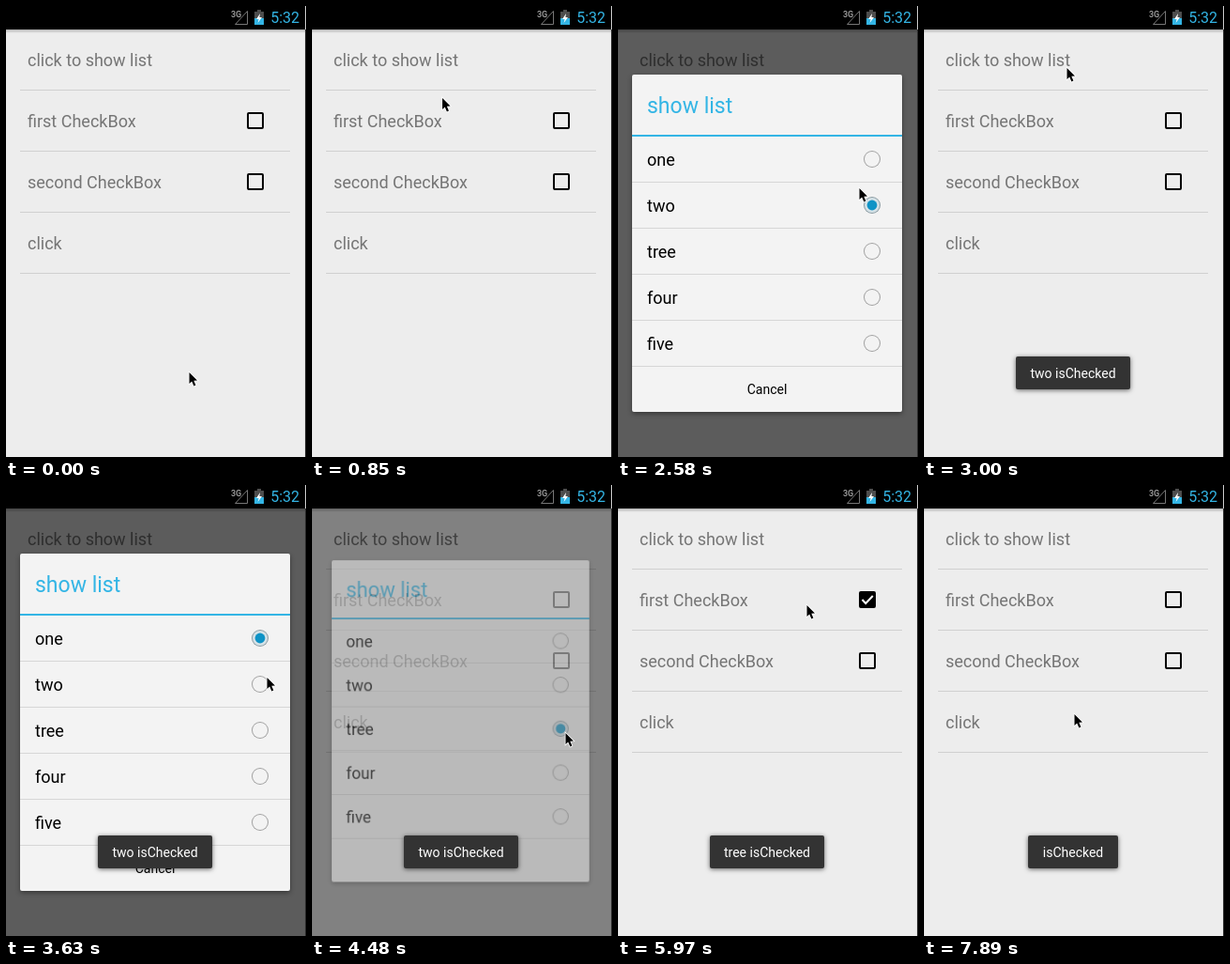
An HTML page with a canvas for the animation above (8 s loop, 320x480 px).

```html
<!DOCTYPE html>
<html lang="en">
<head>
<meta charset="utf-8">
<title>Lists and checkboxes</title>
<style>
html, body { margin: 0; width: 100%; height: 100%; overflow: hidden; background: #ededed; }
canvas { display: block; width: 320px; height: 480px; }
</style>
</head>
<body>
<canvas id="stage" width="320" height="480"></canvas>
<script>
const screen2d = document.getElementById('stage').getContext('2d');
const layer = document.createElement('canvas');
layer.width = 320;
layer.height = 480;
const layer2d = layer.getContext('2d');
let ctx = screen2d;

const LOOP = 8000;
const TICK = 640 / 3; // the screen refreshes once per tick; times below are in ticks
const BLUE = '#33b5e5';
const ROWS = ['click to show list', 'first CheckBox', 'second CheckBox', 'click'];
const ITEMS = ['one', 'two', 'tree', 'four', 'five'];

const DIALOGS = [
  { open: 5.4, close: 12, pick: 1 },
  { open: 15.2, close: 20.5, pick: 2 }
];
const TOASTS = [
  { start: 12.3, label: 'two isChecked' },
  { start: 21.5, label: 'tree isChecked' },
  { start: 30.5, label: 'isChecked' }
];
const HOME = { x: 195, y: 390 };
const MOVES = [
  { from: 0, to: 5, x: 132, y: 64 },
  { from: 6, to: 10, x: 257, y: 194 },
  { from: 12, to: 14, x: 152, y: 66 },
  { from: 15, to: 17, x: 278, y: 205 },
  { from: 17, to: 19, x: 270, y: 264 },
  { from: 22, to: 25, x: 157, y: 122 },
  { from: 26, to: 28, x: 201, y: 128 },
  { from: 34, to: 37, x: 160, y: 244 }
];

const clamp = v => Math.min(1, Math.max(0, v));
const ease = v => v * v * (3 - 2 * v);

function rect(x, y, w, h, color) {
  ctx.fillStyle = color;
  ctx.fillRect(x, y, w, h);
}

function panel(x, y, w, h, r, color) {
  ctx.fillStyle = color;
  ctx.beginPath();
  ctx.roundRect(x, y, w, h, r);
  ctx.fill();
}

function path(points, close) {
  ctx.beginPath();
  points.forEach(([x, y]) => ctx.lineTo(x, y));
  if (close) ctx.closePath();
}

function text(str, x, y, size, color, align = 'left', weight = 400) {
  ctx.font = `${weight} ${size}px Roboto, sans-serif`;
  ctx.textAlign = align;
  ctx.fillStyle = color;
  ctx.fillText(str, x, y);
}

function dot(x, y, r, color) {
  ctx.fillStyle = color;
  ctx.beginPath();
  ctx.arc(x, y, r, 0, Math.PI * 2);
  ctx.fill();
}

function shadow(color, blur, dy) {
  ctx.shadowColor = color;
  ctx.shadowBlur = blur;
  ctx.shadowOffsetY = dy;
}

// Paints a group on its own layer so that it fades as one piece.
function group(alpha, scale, paint) {
  layer2d.clearRect(0, 0, 320, 480);
  ctx = layer2d;
  paint();
  ctx = screen2d;
  ctx.save();
  ctx.globalAlpha = alpha;
  ctx.translate(159, 252.5);
  ctx.scale(scale, scale);
  // a shrunken dialog also sits slightly up and to the left
  ctx.translate(-159 - (1 - scale) * 14, -252.5 - (1 - scale) * 28);
  ctx.drawImage(layer, 0, 0);
  ctx.restore();
}

function statusBar() {
  rect(0, 0, 320, 25, '#000');
  text('3G', 240, 12, 9, '#a8a8a8', 'left', 500);
  ctx.strokeStyle = '#777';
  ctx.lineWidth = 1;
  path([[244.5, 19.5], [257.5, 19.5], [257.5, 5.5]], true);
  ctx.stroke();
  rect(268, 4, 4, 2, '#4d4d4d');
  rect(265, 6, 10, 7, '#4d4d4d');
  rect(265, 13, 10, 7, BLUE);
  ctx.fillStyle = '#fff';
  path([[271, 8], [267, 14], [269.6, 14], [268.6, 18], [273, 12], [270.4, 12]], true);
  ctx.fill();
  text('5:32', 313, 18, 16, BLUE, 'right');
  rect(319, 0, 1, 25, '#ccc');
  rect(319, 25, 1, 455, '#333');
}

function checkBox(y, checked) {
  ctx.lineWidth = 2;
  ctx.strokeStyle = '#000';
  ctx.beginPath();
  ctx.roundRect(258, y - 8, 16, 16, 1);
  ctx.stroke();
  if (!checked) return;
  rect(258, y - 8, 16, 16, '#000');
  ctx.strokeStyle = '#fff';
  path([[260.5, y], [264.2, y + 4], [271.8, y - 4]]);
  ctx.stroke();
}

function home(pressed, checked) {
  rect(0, 25, 320, 455, '#ededed');
  const fade = ctx.createLinearGradient(0, 25, 0, 29);
  fade.addColorStop(0, 'rgba(0,0,0,.25)');
  fade.addColorStop(1, 'rgba(0,0,0,0)');
  rect(0, 25, 320, 4, fade);
  if (pressed) rect(15, 25, 288, 64, 'rgba(51,181,229,.4)');
  ROWS.forEach((label, i) => {
    text(label, 23, 64 + i * 65, 18, '#757575');
    rect(15, 89 + i * 65, 288, 1, '#d0d0d0');
  });
  checkBox(122, checked);
  checkBox(187, false);
}

function radio(y, on) {
  dot(271, y, 9, on ? '#8b9ba2' : '#a0a0a0');
  dot(271, y, 8, on ? '#d5e2e7' : '#f3f3f3');
  if (on) dot(271, y, 5.4, '#0f93c6');
}

function dialogBox(chosen) {
  shadow('rgba(0,0,0,.4)', 5, 2);
  panel(15, 73, 288, 359, 2, '#f3f3f3');
  shadow('transparent', 0, 0);
  text('show list', 31, 114, 23, BLUE);
  rect(15, 137, 288, 2, BLUE);
  ITEMS.forEach((label, i) => {
    const y = 163 + i * 49;
    text(label, 31, y + 7, 18, '#000');
    radio(y, i === chosen);
    rect(15, y + 24, 288, 1, '#d6d6d6');
  });
  text('Cancel', 159, 413, 14, '#000', 'center');
}

function dialog({ open, close, pick }, s) {
  const enter = clamp(s - open);
  const leave = clamp((s - close) / 2);
  const dim = .61 * enter ** 3.4 * (1 - leave);
  const alpha = Math.min(enter, clamp(1 - 2 * leave));
  rect(0, 25, 320, 455, `rgba(0,0,0,${dim})`);
  if (!alpha) return;
  const chosen = s > close - 1 ? pick : 0;
  group(alpha, .907 + .093 * alpha, () => dialogBox(chosen));
}

// The old toast fades out while the next one fades in.
function toasts(s) {
  const fadeIn = toast => toast ? clamp((s - toast.start) / 1.5) : 0;
  const shown = TOASTS.map((toast, i) => ({
    label: toast.label,
    w: toast.label === 'isChecked' ? 96 : 122,
    alpha: Math.min(fadeIn(toast), clamp(1.5 * (1 - fadeIn(TOASTS[i + 1]))))
  })).filter(toast => toast.alpha);
  ctx.save();
  shadow('rgba(0,0,0,.6)', 5, 1);
  for (const { w, alpha } of shown) {
    ctx.globalAlpha = alpha;
    panel(159 - w / 2, 373, w, 35, 2, '#333');
  }
  shadow('transparent', 0, 0);
  for (const { label, alpha } of shown) {
    ctx.globalAlpha = alpha;
    text(label, 159, 396, 14, '#fff', 'center');
  }
  ctx.restore();
}

function cursor(s) {
  let { x, y } = HOME;
  for (const move of MOVES) {
    const k = ease(clamp((s - move.from) / (move.to - move.from)));
    x += (move.x - x) * k;
    y += (move.y - y) * k;
  }
  ctx.save();
  ctx.translate(x, y);
  path([[.5, 0], [.5, 12], [3.2, 9.6], [5.4, 14.5], [7.4, 13.6], [5.3, 8.8], [9, 8.5]], true);
  ctx.lineWidth = 1.5;
  ctx.strokeStyle = '#fff';
  ctx.stroke();
  ctx.fillStyle = '#000';
  ctx.fill();
  ctx.restore();
}

function draw(t) {
  const s = Math.floor((t + 6) / TICK);
  home(s === 5, s >= 27 && s < 35);
  DIALOGS.forEach(d => dialog(d, s));
  toasts(s);
  statusBar();
  cursor(s);
}

const start = performance.now();
function frame() {
  draw((performance.now() - start) % LOOP);
  requestAnimationFrame(frame);
}
frame();
</script>
</body>
</html>
```
